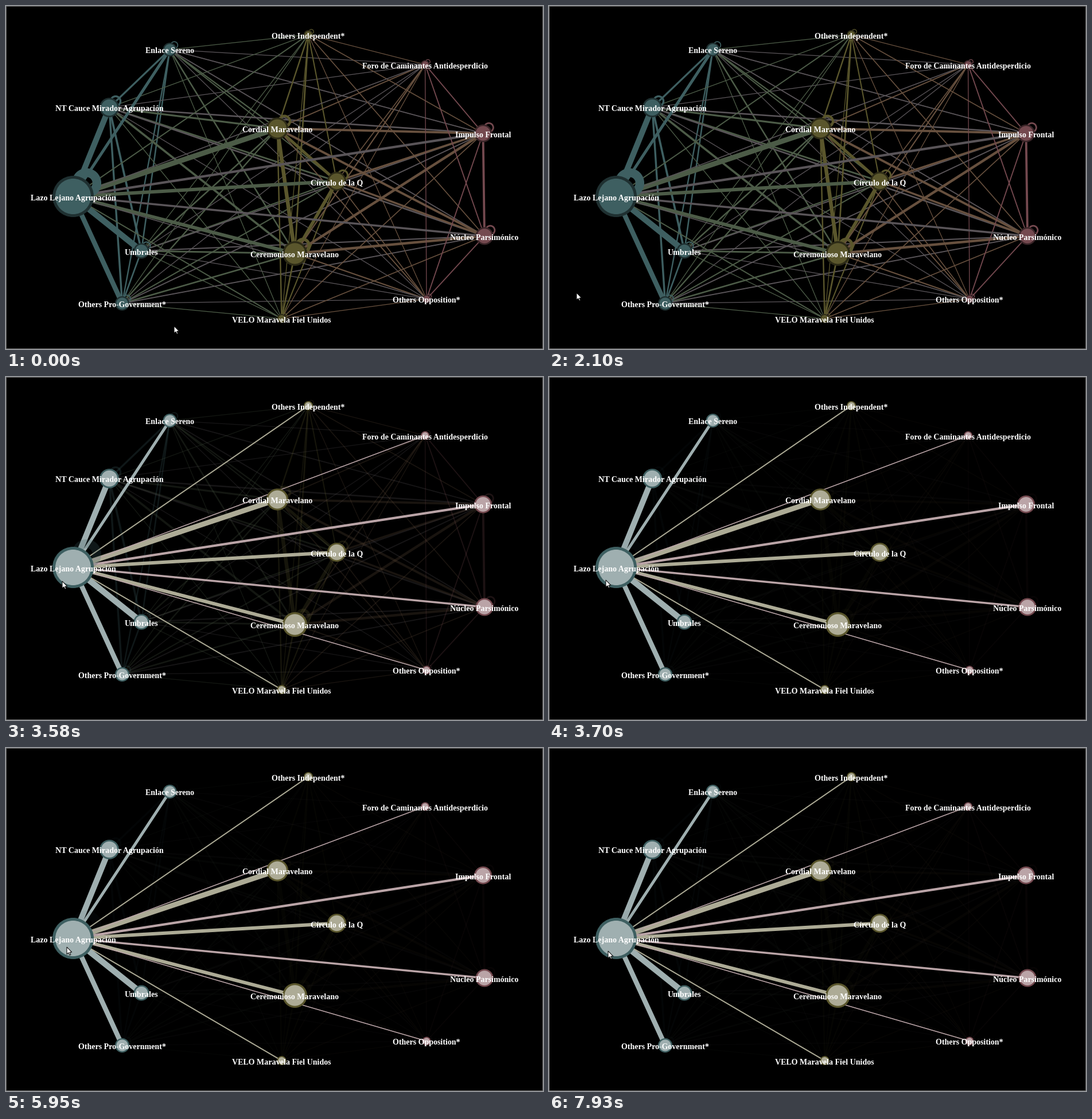
A matplotlib script for the animation above (8 s loop, 936x598 px).

```python
from itertools import combinations

import matplotlib.pyplot as plt
import numpy as np
from matplotlib.animation import FuncAnimation
from matplotlib.collections import LineCollection
from matplotlib.patches import Circle, Polygon, Rectangle

W, H, DPI = 936, 598, 100
PX = 72 / DPI
LOOP, STEP = 8000, 40
THIN = 1.3
HOVER, FADE_STEP = 3580, 120

# x, y, radius, side, width of the link to the hub, label; the hub comes last
NODES = [
    (285.5, 76, 12, "gov", 5, "Enlace Sereno"),
    (180, 177, 17, "gov", 10, "NT Cauce Mirador Agrupación"),
    (236, 427, 13.5, "gov", 10.5, "Umbrales"),
    (202.5, 518.5, 12.5, "gov", 8.5, "Others Pro-Government*"),
    (527, 50, 8, "ind", 2, "Others Independent*"),
    (473, 213.5, 19, "ind", 9, "Cordial Maravelano"),
    (576.5, 305.5, 16.5, "ind", 6, "Círculo de la Q"),
    (503.5, 431.5, 21.5, "ind", 6, "Ceremonioso Maravelano"),
    (480.5, 545, 8, "ind", 2, "VELO Maravela Fiel Unidos"),
    (730.5, 102, 7.5, "opp", 1.6, "Foro de Caminantes Antidesperdicio"),
    (831.5, 222, 15.5, "opp", 4.2, "Impulso Frontal"),
    (834, 401, 15.5, "opp", 3.5, "Núcleo Parsimónico"),
    (733, 511, 7.5, "opp", 1.6, "Others Opposition*"),
    (117, 332, 36, "gov", 0, "Lazo Lejano Agrupación"),
]
HUB = NODES[-1]
FILL = {
    side: np.array(c) / 255
    for side, c in {"gov": (62, 95, 97), "ind": (90, 86, 44), "opp": (116, 73, 79)}.items()
}

# Pointer strokes: start ms, end ms, steps, bend, end point
START = (293, 558)
STROKES = [
    (120, 840, 7, (225, 572), (132, 552)),
    (1730, 2100, 4, (100, 525), (48, 500)),
    (2740, 3460, 7, (58, 425), (96, 361)),
    (3580, 3700, 2, (99, 354), (99, 354)),
    (5220, 5580, 4, (103, 352), (106, 340)),
    (5830, 6670, 8, (106, 366), (105, 349)),
    (7690, 7930, 3, (105, 352), (103, 354)),
]
ARROW = np.array([(0, 0), (0, 12.5), (2.9, 9.8), (4.9, 14), (6.8, 13.2), (4.9, 9.1), (8.8, 9)])


def lighten(color):
    return (1 + color) / 2


def edge_width(a, b):
    """Bigger nodes share thicker edges, less so between distant camps."""
    if b is HUB:
        return a[4]
    sides = {a[3], b[3]}
    bond = 1.2 if len(sides) == 1 else 0.75 if "gov" in sides else 1
    return max(THIN, bond * a[2] * b[2] / 75)


def pointer_at(t):
    pos = np.array(START, float)
    for start, end, steps, bend, stop in STROKES:
        if t < start:
            break
        done = min(steps, 1 + (t - start) * (steps - 1) // (end - start))
        u = done / steps
        u = u * u * (3 - 2 * u)
        pos = (1 - u) ** 2 * pos + 2 * u * (1 - u) * np.array(bend) + u * u * np.array(stop)
    return np.round(pos)


fig = plt.figure(figsize=(W / DPI, H / DPI), dpi=DPI, facecolor="#6a6a6a")
ax = fig.add_axes([0, 0, 1, 1])
ax.set_xlim(0, W)
ax.set_ylim(H, 0)
ax.axis("off")
ax.add_patch(Rectangle((1, 1), W - 2, H - 2, fc="black", lw=0, zorder=0))

pairs = list(combinations(NODES, 2))
pairs.sort(key=lambda p: p[1] is HUB)
edges = ax.add_collection(LineCollection(
    [(a[:2], b[:2]) for a, b in pairs],
    linewidths=[edge_width(a, b) * PX for a, b in pairs],
    zorder=1,
))

discs, rings = [], []
for x, y, r, side, _, label in NODES:
    rim = 1 + 0.11 * r
    ring_width = max(THIN, r * r / 85)
    rings.append(ax.add_patch(Circle((x + 0.65 * r, y - 0.65 * r), r / 2, fill=False,
                                     lw=ring_width * PX, zorder=2)))
    discs.append(ax.add_patch(Circle((x, y), r - rim / 2, lw=rim * PX, zorder=3)))
    ax.text(x, y + 6.5, label, color="white", family="Liberation Serif", weight="bold",
            size=14 * PX, ha="center", va="baseline", zorder=4)

pointer = ax.add_patch(Polygon(ARROW, fc="white", ec="black", lw=PX, zorder=6))


def paint(lit, rest):
    """Colour the graph; rest is the opacity of whatever is not linked to the hub."""
    colors = []
    for a, b in pairs:
        if lit and b is HUB:
            colors.append((*lighten(FILL[a[3]]), 1))
        else:
            colors.append((*(FILL[a[3]] + FILL[b[3]]) / 2, rest))
    edges.set_color(colors)
    for node, disc, ring in zip(NODES, discs, rings):
        base = FILL[node[3]]
        ring.set_edgecolor((*base, rest))
        disc.set_facecolor(lighten(base) if lit else base)
        disc.set_edgecolor(base if lit else base / 2)


def update(i):
    t = (i + 1) * STEP - 10
    fade = np.clip((t - HOVER) // FADE_STEP + 1, 0, 2)
    paint(fade > 0, 0.25 ** float(fade))
    pointer.set_xy(ARROW + pointer_at(t))
    return edges, pointer, *discs, *rings


anim = FuncAnimation(fig, update, frames=LOOP // STEP, interval=STEP, repeat=True, repeat_delay=0)
plt.show()
```
